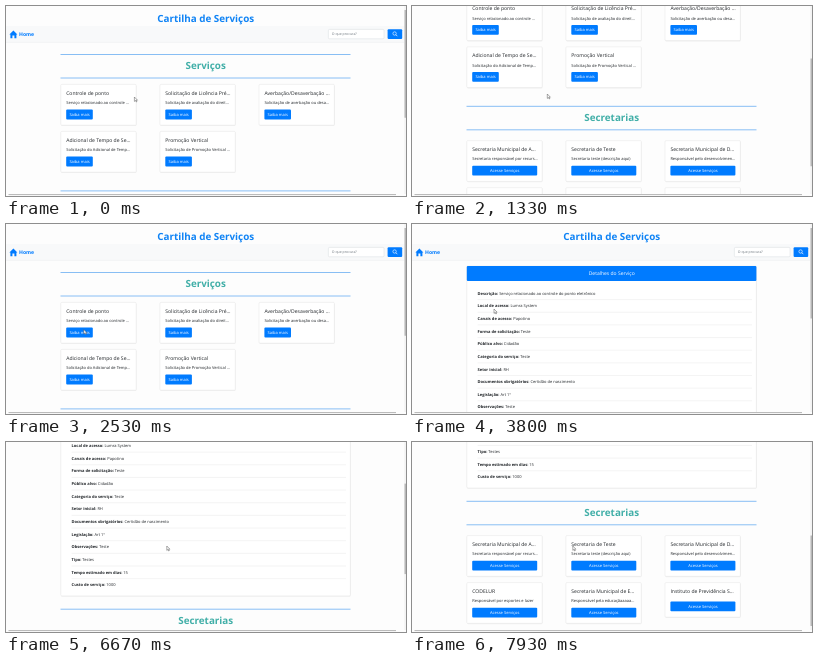
Recreate the animation shown at these times as an HTML page. Size 400 px wide and 190 px high, loop 8 s.

```html
<!DOCTYPE html>
<html lang="pt-BR">
<head>
<meta charset="utf-8">
<title>Cartilha de Serviços</title>
<style>
  html, body { margin: 0; width: 100%; height: 100%; overflow: hidden; background: #fdfdfd; }
  svg { display: block; width: 100vw; height: 100vh; }
  text { font-family: "Open Sans", "Noto Sans", sans-serif; text-rendering: geometricPrecision; white-space: pre; }
</style>
</head>
<body>
<svg id="stage" viewBox="0 0 400 190"></svg>
<script>
const BLUE = '#007bff', TEAL = '#42afa8', INK = '#212529', PAPER = '#fdfdfd';
const LOOP = 8000, VIEW = 188, SWAP = 3200;

const rect = (x, y, w, h, fill, extra = '') =>
  `<rect x="${x}" y="${y}" width="${w}" height="${h}" fill="${fill}" ${extra}/>`;

// y is the middle of the capital letters
const text = (x, y, size, str, fill = INK, extra = '') =>
  `<text x="${x}" y="${y + size * 0.355}" font-size="${size}" fill="${fill}" ${extra}>${str}</text>`;

const MID = 'text-anchor="middle"', BOLD = 'font-weight="700"';

const line = (x1, x2, y, color, width) =>
  `<path d="M${x1} ${y}H${x2}" stroke="${color}" stroke-width="${width}"/>`;

const heading = (y, str) =>
  line(54.5, 344.5, y, '#4a9df0', 0.65) +
  text(199.7, y + 11.3, 9.85, str, TEAL, `${MID} ${BOLD}`) +
  line(54.5, 344.5, y + 23.5, '#4a9df0', 0.65);

const box = (x, y, w, h) =>
  rect(x + 0.3, y + 0.8, w, h, '#000', 'rx="1" opacity=".05"') +
  rect(x, y, w, h, '#fff', 'rx="1" stroke="#dfdfdf" stroke-width=".4"');

function card(i, top, [title, desc], label, wide) {
  const x = 54.8 + (i % 3) * 99.1, y = top + Math.floor(i / 3) * 47;
  const by = y + (desc ? 25.2 : 18.8), bw = wide ? 65 : 26.6;
  return box(x, y, 75.4, desc ? 40.8 : 34.6) +
    text(x + 5.4, y + 8.9, 5.05, title) +
    text(x + 5.4, y + 18.4, 4, desc) +
    rect(x + 5.4, by, bw, 9.8, BLUE, 'rx="1"') +
    text(x + 5.4 + bw / 2, by + 4.9, 4.05, label, '#fff', MID);
}

const services = [
  ['Controle de ponto', 'Serviço relacionado ao controle …'],
  ['Solicitação de Licência Pré…', 'Solicitação de avaliação do direit…'],
  ['Averbação/Desaverbação …', 'Solicitação de averbação ou desa…'],
  ['Adicional de Tempo de Se…', 'Solicitação do Adicional de Temp…'],
  ['Promoção Vertical', 'Solicitação de Promoção Vertical …']
];
const offices = [
  ['Secretaria Municipal de A…', 'Secretaria responsável por recurs…'],
  ['Secretaria de Teste', 'Secretaria teste (descrição aqui)'],
  ['Secretaria Municipal de D…', 'Responsável pelo desenvolvimen…'],
  ['CODELUR', 'Responsável por esportes e lazer'],
  ['Secretaria Municipal de E…', 'Responsável pela educaçãaaaaa…'],
  ['Instituto de Previdência S…', '']
];
const details = [
  ['Descrição', 'Serviço relacionado ao controle do ponto eletrônico'],
  ['Local de acesso', 'Lumra System'],
  ['Canais de acesso', 'Papotino'],
  ['Forma de solicitação', 'Teste'],
  ['Público alvo', 'Cidadão'],
  ['Categoria do serviço', 'Teste'],
  ['Setor inicial', 'RH'],
  ['Documentos obrigatórios', 'Certidão de nascimento'],
  ['Legislação', 'Art 1°'],
  ['Observações', 'Teste'],
  ['Tipo', 'Testes'],
  ['Tempo estimado em dias', '15'],
  ['Custo de serviço', '1000']
];

const header =
  text(199.7, 12.4, 9.85, 'Cartilha de Serviços', '#0f83f5', `${MID} ${BOLD}`) +
  rect(0, 20, 398.3, 16.4, '#f8f9fa') +
  line(0, 398.3, 36.3, '#e6e8ea', 0.5) +
  `<path d="M3.4 28.4L7.4 24.6L11.4 28.4H10.4V32.2H8.4V29.6H6.4V32.2H4.4V28.4Z" fill="${BLUE}"/>` +
  text(13, 28.3, 5.1, 'Home', BLUE, BOLD) +
  rect(322.4, 23.4, 55.6, 9.4, '#fff', 'rx="1" stroke="#ced4da" stroke-width=".4"') +
  text(325.8, 28.2, 3.5, 'O que procura?', '#6c757d') +
  rect(381.6, 23.2, 14.6, 9.7, BLUE, 'rx="1"') +
  '<path d="M389.9 28.7L391.3 30.2" stroke="#fff" stroke-width=".7"/>' +
  '<circle cx="388.6" cy="27.5" r="1.7" fill="none" stroke="#fff" stroke-width=".6"/>';

const officeBlock = top => heading(top, 'Secretarias') +
  offices.map((o, i) => card(i, top + 34.3, o, 'Acesse Serviços', true)).join('');

const detailRow = ([label, value], i) => {
  const y = 69.2 + i * 12.65;
  return text(65.6, y, 4, `<tspan ${BOLD}>${label}:</tspan> ${value}`) +
    (i < details.length - 1 ? line(65.6, 340, y + 6.4, '#e2e2e2', 0.4) : '');
};

const home = heading(48.5, 'Serviços') +
  services.map((s, i) => card(i, 78.4, s, 'Saiba mais', false)).join('') +
  officeBlock(184.9);

const detail = box(54.8, 42, 289.6, 190) +
  rect(54.8, 42, 289.6, 15, BLUE, 'rx="1"') +
  text(199.7, 49.3, 5, 'Detalhes do Serviço', '#fff', MID) +
  details.map(detailRow).join('') +
  officeBlock(245.3);

const stage = document.getElementById('stage');
stage.innerHTML =
  `<clipPath id="view">${rect(0, 0, 400, VIEW, '#fff')}</clipPath>` +
  rect(0, 0, 400, 190, PAPER) +
  `<g clip-path="url(#view)"><g id="page">${header}<g id="home">${home}</g><g id="detail">${detail}</g></g></g>` +
  rect(398.3, 0, 1.7, VIEW, '#f3f3f3') +
  rect(398.6, 4, 1.2, 90, '#a9a9a9', 'id="thumb"') +
  line(2.5, 390, 188.6, '#b4b4b4', 1) +
  '<path id="mouse" d="M0 0V4.4L1.1 3.5L1.9 5L2.5 4.7L1.8 3.2H3.1Z" fill="#fff" stroke="#444" stroke-width=".45"/>';

const [page, homeEl, detailEl, thumb, mouse] =
  ['page', 'home', 'detail', 'thumb', 'mouse'].map(id => document.getElementById(id));

// keys: [time, ...values]
const scrollKeys = [[0, 0], [470, 0], [930, 64], [1210, 103], [1670, 33], [1910, 0],
  [5950, 0], [6670, 78], [7670, 186]];
const mouseKeys = [[0, 128.4, 91], [120, 128.4, 91], [480, 135.3, 88], [1950, 135.3, 88],
  [2650, 73, 107], [3250, 73, 107], [3700, 82, 85], [3900, 82, 85], [4330, 74, 82],
  [5150, 160.8, 104]];

function sample(keys, t, ease) {
  const n = keys.findIndex(k => k[0] > t);
  if (n < 0) return keys[keys.length - 1].slice(1);
  const a = keys[n - 1], b = keys[n];
  const p = ease((t - a[0]) / (b[0] - a[0]));
  return a.slice(1).map((v, i) => v + (b[i + 1] - v) * p);
}
const linear = p => p;
const smooth = p => p * p * (3 - 2 * p);

function draw(t) {
  const onHome = t < SWAP, height = onHome ? 314 : 374;
  const [scroll] = sample(scrollKeys, t, linear);
  const [mx, my] = sample(mouseKeys, t, smooth);
  homeEl.style.display = onHome ? '' : 'none';
  detailEl.style.display = onHome ? 'none' : '';
  page.setAttribute('transform', `translate(0 ${-scroll})`);
  thumb.setAttribute('y', 4 + scroll / height * 180);
  thumb.setAttribute('height', VIEW / height * 180);
  mouse.setAttribute('transform', `translate(${mx} ${my})`);
}

const start = performance.now();
function tick() {
  draw((performance.now() - start) % LOOP);
  requestAnimationFrame(tick);
}
tick();
</script>
</body>
</html>
```
